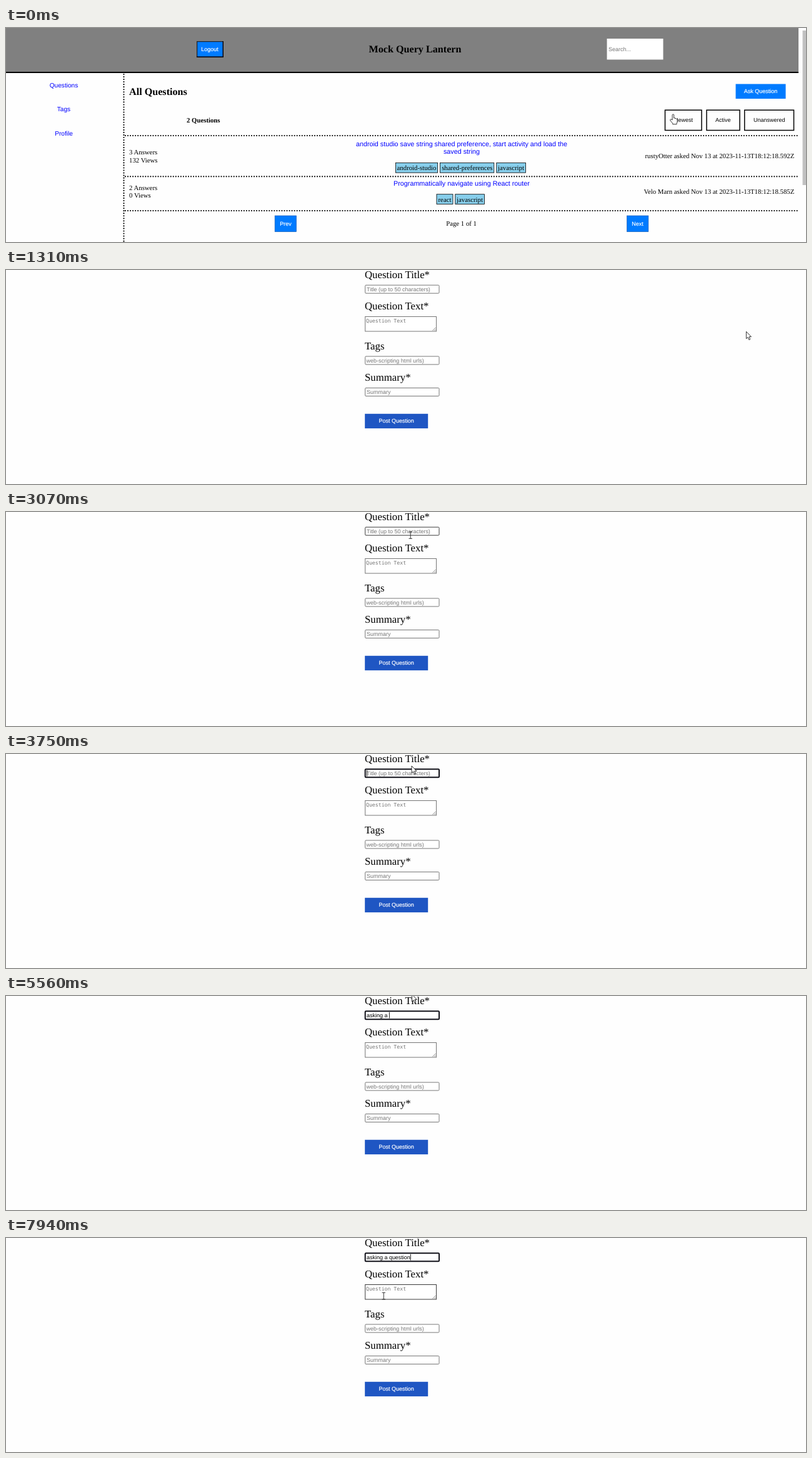
Write an HTML page that moves like this. It is 1280 px wide and 342 px high and loops after 8 s.

```html
<!DOCTYPE html>
<html lang="en">
<head>
<meta charset="utf-8">
<title>Ask a question</title>
<style>
  html, body { margin: 0; width: 100%; height: 100%; overflow: hidden; background: #fefefe; }
  svg { display: block; }
  text { font: 10.77px "Liberation Serif", "Times New Roman", serif; text-rendering: geometricPrecision; white-space: pre; }
  .mid { text-anchor: middle; }
  .end { text-anchor: end; }
  .bold { font-weight: bold; }
  .head { font-size: 16.15px; font-weight: bold; }
  .label { font-size: 16.8px; }
  .link, .ui { font-family: "Liberation Sans", Arial, sans-serif; }
  .link { fill: #00f; text-anchor: middle; }
  .side { font-size: 10.1px; }
  .ui { font-size: 8.97px; }
  .hint { fill: #757575; }
  .mono { font: 8.2px "DejaVu Sans Mono", monospace; }
  .white { fill: #fff; stroke: #fff; stroke-width: .2; text-anchor: middle; }
  .blue { fill: #007bff; }
  .edge { stroke: #0a58b5; stroke-width: .7; }
  .dots { fill: none; stroke: #000; stroke-width: 2.2; stroke-linecap: round; stroke-dasharray: 0 4.04; }
  .filter { fill: none; stroke: #000; stroke-width: 1.5; }
  .tag { fill: #87ceeb; stroke: #000; stroke-width: .8; }
  .field { fill: #fff; stroke: #767676; stroke-width: 1; }
  .field.hover { stroke: #3c3c3c; }
  .field.focus { stroke: #101018; stroke-width: 2; }
  .pointer { fill: #fff; stroke: #000; stroke-width: .8; stroke-linejoin: round; }
  .beam { fill: none; stroke: #222; stroke-width: .9; }
</style>
</head>
<body>
<svg width="1280" height="342" viewBox="0 0 1280 342">
  <g id="list">
    <rect width="1268" height="70" fill="#808080"/>
    <rect y="70" width="1268" height="2"/>
    <rect x="1274.5" y="4" width="5.5" height="247" fill="#c1c1c1"/>

    <rect class="blue" x="305" y="21" width="43" height="26"/>
    <path d="M305.6 47V21.6H348" fill="none" stroke="#262626" stroke-width="1.3"/>
    <path d="M305 46.3H347.3V21" fill="none" stroke="#000" stroke-width="1.4"/>
    <text class="ui white" x="326" y="37">Logout</text>
    <text class="head mid" x="654.5" y="39">Mock Query Lantern</text>
    <rect x="961.5" y="17" width="90" height="33.5" fill="#fff"/>
    <text class="ui hint" x="964" y="37">Search...</text>

    <path class="dots" d="M188.5 74V342M191 172H1268M191 237.3H1268M191 292H1268"/>
    <text class="link side" x="92.5" y="95">Questions</text>
    <text class="link side" x="92.5" y="133.3">Tags</text>
    <text class="link side" x="92.5" y="171.7">Profile</text>

    <text class="head" x="197" y="106.5">All Questions</text>
    <rect class="blue" x="1167.5" y="89.5" width="80" height="23.5"/>
    <text class="ui white" x="1207.5" y="104.3">Ask Question</text>
    <text class="bold" x="289" y="151">2 Questions</text>
    <rect id="tint" x="1062" y="137" width="47" height="17" fill="#f5f5f5"/>
    <rect class="filter" x="1054.5" y="131.2" width="58.5" height="32.3"/>
    <rect class="filter" x="1121" y="131.2" width="53" height="32.3"/>
    <rect class="filter" x="1181.7" y="131.2" width="78.8" height="32.3"/>
    <text class="ui mid" x="1084" y="150.2">Newest</text>
    <text class="ui mid" x="1147.3" y="150.2">Active</text>
    <text class="ui mid" x="1221.2" y="150.2">Unanswered</text>

    <text x="197" y="202.3">3 Answers</text>
    <text x="197" y="214.5">132 Views</text>
    <text class="link" x="729" y="189">android studio save string shared preference, start activity and load the</text>
    <text class="link" x="729" y="201.3">saved string</text>
    <rect class="tag" x="623.4" y="215.4" width="67.2" height="15.8"/>
    <rect class="tag" x="694.6" y="215.4" width="86.2" height="15.8"/>
    <rect class="tag" x="784.8" y="215.4" width="46.6" height="15.8"/>
    <text class="mid" x="657" y="227">android-studio</text>
    <text class="mid" x="737.8" y="227">shared-preferences</text>
    <text class="mid" x="808" y="227">javascript</text>
    <text class="end" x="1261.3" y="208.3">rustyOtter asked Nov 13 at 2023-11-13T18:12:18.592Z</text>

    <text x="197" y="258.7">2 Answers</text>
    <text x="197" y="270.9">0 Views</text>
    <text class="link" x="729" y="251.7">Programmatically navigate using React router</text>
    <rect class="tag" x="689" y="265.7" width="26" height="15.8"/>
    <rect class="tag" x="718.8" y="265.7" width="46.6" height="15.8"/>
    <text class="mid" x="702" y="277.5">react</text>
    <text class="mid" x="742" y="277.5">javascript</text>
    <text class="end" x="1261.3" y="264.7">Velo Marn asked Nov 13 at 2023-11-13T18:12:18.585Z</text>

    <rect class="blue edge" x="430.2" y="300" width="34.3" height="25.5"/>
    <rect class="blue edge" x="993.5" y="300" width="34.3" height="25.5"/>
    <text class="ui white" x="447.4" y="315.8">Prev</text>
    <text class="mid" x="728.6" y="316">Page 1 of 1</text>
    <text class="ui white" x="1010.6" y="315.8">Next</text>
  </g>

  <g id="form">
    <text class="label" x="574" y="13">Question Title*</text>
    <rect class="field" id="title" x="574.7" y="24.2" width="118.3" height="13" rx="1.3"/>
    <text class="ui" id="typed" x="577" y="33.8"></text>
    <text class="ui hint" id="hint" x="577" y="33.8">Title (up to 50 characters)</text>
    <rect id="caret" y="25.8" width=".9" height="9.8"/>

    <text class="label" x="574" y="63.4">Question Text*</text>
    <rect class="field" id="body" x="574.7" y="74.5" width="113.8" height="23.5"/>
    <text class="mono hint" x="576" y="84.3">Question Text</text>
    <path d="M682.5 97L687.5 92M685.5 97L687.5 95" stroke="#555" stroke-width=".7"/>

    <text class="label" x="574" y="127">Tags</text>
    <rect class="field" x="574.7" y="138" width="118.3" height="13" rx="1.3"/>
    <text class="ui hint" x="576.5" y="147.6">web-scripting html urls)</text>

    <text class="label" x="574" y="177.3">Summary*</text>
    <rect class="field" x="574.7" y="188.5" width="118.3" height="13" rx="1.3"/>
    <text class="ui hint" x="577" y="198.2">Summary</text>

    <rect x="574.2" y="229.8" width="101" height="23.3" fill="#1f56c3"/>
    <text class="ui white" x="624.7" y="244.3">Post Question</text>
  </g>

  <path id="cursor"/>
</svg>
<script>
  const LOOP = 8000, PAGE = 1310, FOCUS = 3350;
  const PHRASE = 'asking a question';
  const $ = id => document.getElementById(id);

  const shapes = {
    arrow: 'M0 0V11.4L2.6 9 4.4 13.2 6.3 12.4 4.6 8.3H8Z',
    hand: 'M-1.4 9V1.2a1.3 1.3 0 0 1 2.6 0V6q1.8-.7 2.1.6 1.7-.6 1.9.7 1.4-.2 1.4 1.5v2.6q0 1.6-1 3V15.8H-.8v-1.4L-4.4 10.2q-1.1-1.9.3-2.2T-1.4 9Z',
    beam: 'M-2.7-5.4H2.7M0-5.4V5.4M-2.7 5.4H2.7'
  };

  // [time, shape, x, y]
  const moves = [
    [0, 'hand', 1067.5, 138], [510, 'arrow', 1101, 98], [660, 'arrow', 1128, 96.5],
    [780, 'arrow', 1154, 97], [900, 'hand', 1180, 99], [1060, 'hand', 1183, 98.5],
    [1180, 'hand', 1185.2, 98.5], [1310, 'arrow', 1184.4, 98.4],
    [2150, 'arrow', 860, 67], [2270, 'arrow', 637, 98.4], [2520, 'beam', 642, 88],
    [2640, 'arrow', 646, 60], [2770, 'arrow', 648.5, 42], [2920, 'arrow', 657, 38.4],
    [3070, 'beam', 647.2, 37], [3630, 'beam', 648, 31], [3750, 'arrow', 649, 19],
    [3870, 'arrow', 649.5, 8], [3990, 'arrow', 649.5, 1], [4110, 'arrow', 649.5, -2.5],
    [7320, 'arrow', 645, 7], [7440, 'beam', 629, 33], [7560, 'arrow', 613, 60],
    [7680, 'beam', 604, 84], [7800, 'beam', 601.5, 94], [7940, 'beam', 604.3, 92.6]
  ];

  // [time, letters typed]
  const keys = [
    [0, 0], [4380, 1], [4500, 2], [4780, 3], [4900, 4], [5050, 5], [5170, 6],
    [5320, 7], [5440, 8], [5560, 9], [6060, 10], [6220, 11], [6360, 12],
    [6480, 13], [6610, 15], [6760, 17]
  ];

  const at = (track, t) => track.findLast(step => step[0] <= t);
  const show = (id, on) => $(id).style.display = on ? '' : 'none';

  function draw(t) {
    const [, shape, x, y] = at(moves, t);
    const count = at(keys, t)[1];
    const inForm = t >= PAGE, focused = t >= FOCUS;

    show('list', !inForm);
    show('form', inForm);
    show('tint', t >= 510);

    $('cursor').setAttribute('d', shapes[shape]);
    $('cursor').setAttribute('class', shape === 'beam' ? 'beam' : 'pointer');
    $('cursor').setAttribute('transform', `translate(${x} ${y})`);

    const over = (top, bottom) => shape === 'beam' && y >= top && y <= bottom;
    $('title').classList.toggle('hover', over(24, 38));
    $('title').classList.toggle('focus', focused);
    $('body').classList.toggle('hover', over(74, 98));

    $('typed').textContent = PHRASE.slice(0, count);
    show('hint', !count);
    const blink = (t >= 3870 && t < 4380) || (t >= 7320 && t < 7800);
    show('caret', focused && !blink);
    if (inForm) $('caret').setAttribute('x', 577 + (count ? $('typed').getComputedTextLength() : 0));
  }

  let start;
  function tick(now) {
    start ??= now;
    draw((now - start) % LOOP);
    requestAnimationFrame(tick);
  }
  draw(0);
  requestAnimationFrame(tick);
</script>
</body>
</html>
```
